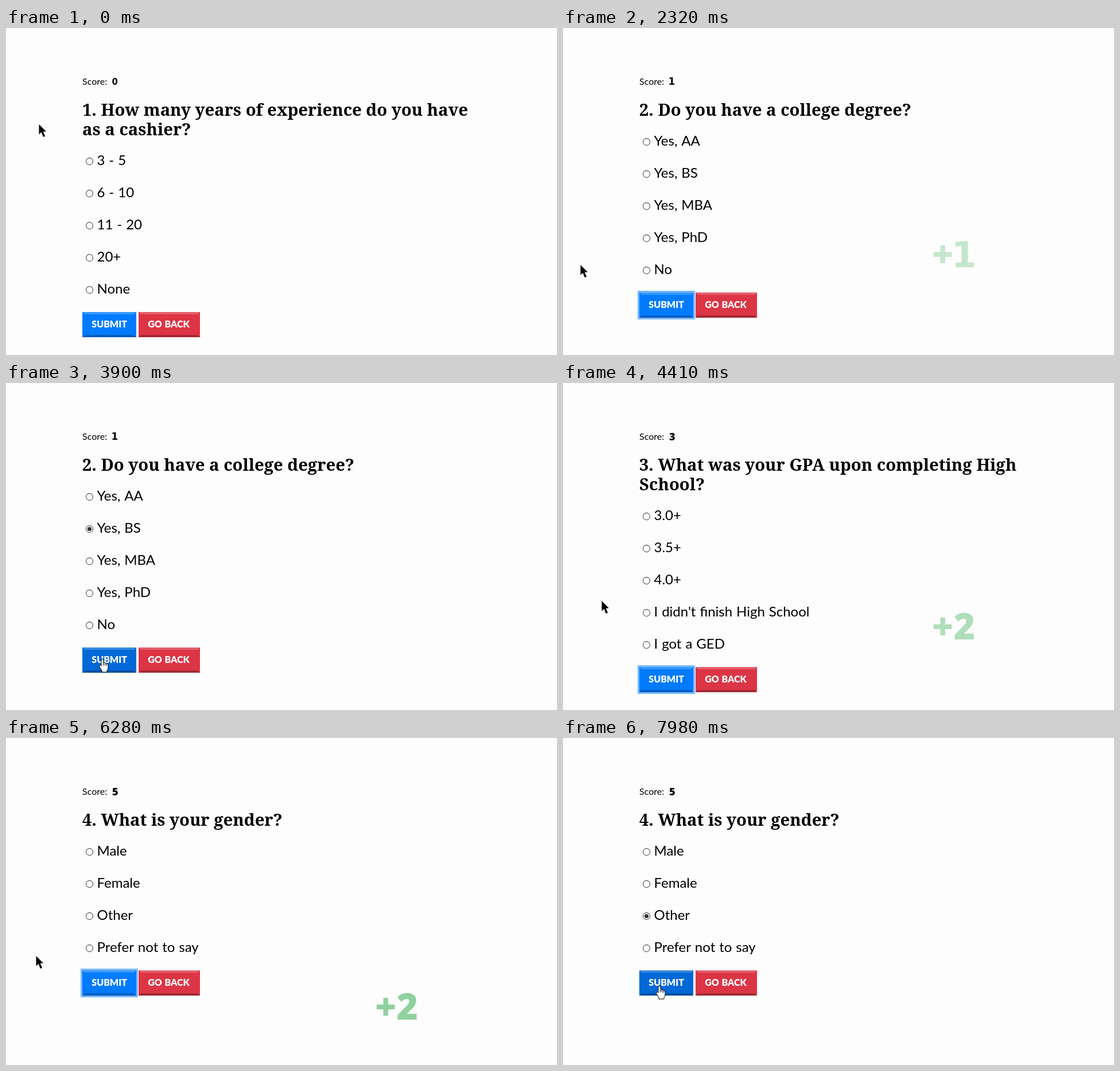
Animation, 960 px wide and 570 px high, one loop 8 s. Source, as an HTML page with a canvas:

```html
<!DOCTYPE html>
<html lang="en">
<head>
<meta charset="utf-8">
<title>Quiz</title>
<style>
html, body { margin: 0; width: 100%; height: 100%; overflow: hidden; background: #fdfdfd; }
canvas { display: block; }
</style>
</head>
<body>
<canvas id="stage" width="960" height="570"></canvas>
<script>
const ctx = document.getElementById('stage').getContext('2d');
const LOOP = 8000, LEFT = 133, WIDTH = 690, STEP = 56, ROW = 48;
const SANS = 'Lato, "Open Sans", sans-serif';
const SERIF = '"Noto Serif", "Liberation Serif", serif';
const DIGITS = '"Open Sans", "Noto Sans", sans-serif';
const SLAB = '"DejaVu Sans", sans-serif';

// pick: option clicked, press: submit clicked, aim: height of that click on the button,
// home and away: where the cursor waits before and after the pick
const pages = [
  { pick: 840, row: 0, press: 1730, aim: 20, home: [57, 168], away: [85, 355], score: 0,
    title: ['1. How many years of experience do you have', 'as a cashier?'],
    options: ['3 - 5', '6 - 10', '11 - 20', '20+', 'None'] },
  { pick: 3290, row: 1, press: 3900, aim: 20, home: [30, 413], away: [93, 350], score: 1, gain: 1,
    title: ['2. Do you have a college degree?'],
    options: ['Yes, AA', 'Yes, BS', 'Yes, MBA', 'Yes, PhD', 'No'] },
  { pick: 5180, row: 1, press: 5890, aim: 20, home: [67, 380], away: [102, 446], score: 3, gain: 2,
    title: ['3. What was your GPA upon completing High', 'School?'],
    options: ['3.0+', '3.5+', '4.0+', "I didn't finish High School", 'I got a GED'] },
  { pick: 7190, row: 2, press: 7970, aim: 27, home: [52, 380], away: [157, 336], score: 5, gain: 2,
    title: ['4. What is your gender?'],
    options: ['Male', 'Female', 'Other', 'Prefer not to say'] }
];

// every page repeats the same trip: home, option, away, submit
const path = [];
let last = -420;
for (const p of pages) {
  p.start = last + 70;
  p.top = 139 + p.title.length * 34;
  p.buttons = p.top + p.options.length * STEP + 8;
  const option = [179, p.top + p.row * STEP + 15];
  const submit = [167, p.buttons + p.aim];
  const stop = (from, to, at) => path.push({ t: from, at }, { t: to, at });
  stop(last + 400, last + 820, p.home);
  stop(p.pick - 165, p.pick + 50, option);
  stop(p.pick + 320, p.pick + 350, p.away);
  stop(p.press - 160, p.press + 20, submit);
  last = p.press;
}

const clamp = v => Math.max(0, Math.min(1, v));
const mix = (a, b, u) => a + (b - a) * u;

function cursorAt(t) {
  const i = path.findIndex(k => k.t > t);
  if (i < 1) return path.at(i).at;
  const a = path[i - 1], b = path[i];
  const u = clamp((t - a.t) / (b.t - a.t)), s = u * u * (3 - 2 * u);
  // bow each move a little towards the height of its right end
  const bow = a.at[0] < b.at[0] ? .6 : .4;
  const y = mix(mix(a.at[1], mix(a.at[1], b.at[1], bow), s),
                mix(mix(a.at[1], b.at[1], bow), b.at[1], s), s);
  return [Math.round(mix(a.at[0], b.at[0], s)), Math.round(y)];
}

const inside = ([px, py], x, y, w, h) => px >= x && px < x + w && py >= y && py < y + h;

function text(str, x, y, font, color = '#000', space = 0) {
  ctx.font = font;
  ctx.fillStyle = color;
  ctx.wordSpacing = space + 'px';
  ctx.fillText(str, x, y);
}

function shape(path2d, fill, stroke, width) {
  ctx.fillStyle = fill;
  ctx.strokeStyle = stroke;
  ctx.lineWidth = width;
  ctx.stroke(path2d);
  ctx.fill(path2d);
}

function disc(x, y, r, color) {
  ctx.fillStyle = color;
  ctx.beginPath();
  ctx.arc(x, y, r, 0, 7);
  ctx.fill();
}

function radio(y, checked, hover) {
  const ink = hover ? '#0067c0' : '#333';
  disc(145.5, y, 6.5, ink);
  disc(145.5, y, 5.5, '#fff');
  if (checked) disc(145.5, y, 3.6, ink);
}

// light or dark bevel strip between two heights
function bevel(x, w, outer, inner, color) {
  ctx.fillStyle = color;
  ctx.beginPath();
  ctx.moveTo(x, outer);
  ctx.lineTo(x + w, outer);
  ctx.lineTo(x + w - 4, inner);
  ctx.lineTo(x + 4, inner);
  ctx.fill();
}

function button(label, x, y, w, color) {
  ctx.fillStyle = color;
  ctx.fillRect(x, y, w, 44);
  bevel(x, w, y, y + 4, 'rgba(255,255,255,.22)');
  bevel(x, w, y + 44, y + 40, 'rgba(0,0,0,.25)');
  text(label, x + 16.3, y + 27, '900 16px ' + SANS, '#fff', 1);
}

const arrow = new Path2D('M0 0V17.5L4 13.8L7.4 22L10.6 20.6L7.2 12.7L12.5 12.4Z');
const hand = new Path2D('M4.5 13V2Q4.5 .5 6 .5T7.5 2V7Q10 6 10.3 8Q12.6 7 13 9' +
  'Q15.5 8.3 15.5 11V15Q15.5 18 13.5 20V22.5H5.5V20Q3 17 1 13.5Q.2 11.5 2 11.3Q3.4 11.4 4.5 13Z');
const fingers = new Path2D('M7.5 7V11.5M10.3 8V11.5M13 9V12');

function drawCursor([x, y], pointing) {
  ctx.save();
  ctx.translate(x + (pointing ? -5 : .5), y);
  if (pointing) {
    shape(hand, '#fff', '#000', 1.8);
    ctx.lineWidth = 1;
    ctx.stroke(fingers);
  } else {
    shape(arrow, '#000', '#fff', 1.6);
  }
  ctx.restore();
}

function drawGain(page, t) {
  const age = t - page.start + 70;
  if (!page.gain || age > 790) return;
  const base = 636 - age * .37, green = '#28a745';
  ctx.globalAlpha = clamp(1 - age / 800);
  text('+', 643.5, base, '800 64px ' + DIGITS, green);
  if (page.gain === 1) text('1', 676.5, base, 'bold 63px ' + SLAB, green);
  else text(page.gain, 680.5, base, '800 64px ' + DIGITS, green);
  ctx.globalAlpha = 1;
}

function drawScore(score) {
  text('Score:', LEFT, 99, '16px ' + SANS);
  if (score === 0) text('0', 185, 99, '900 16px ' + SANS);
  else if (score === 1) text('1', 183.5, 99, 'bold 17px ' + SLAB);
  else text(score, 185, 99.5, '800 18px ' + DIGITS);
}

function draw(t) {
  const page = pages.findLast(p => t >= p.start), { top, buttons } = page;
  const cur = cursorAt(t);
  ctx.fillStyle = '#fdfdfd';
  ctx.fillRect(0, 0, 960, 570);

  drawScore(page.score);
  page.title.forEach((line, i) => text(line, LEFT, 152.5 + i * 34, 'bold 29.2px ' + SERIF));

  page.options.forEach((label, i) => {
    const y = top + i * STEP;
    const hover = inside(cur, LEFT, y, WIDTH, ROW);
    if (hover) {
      ctx.fillStyle = '#e3e3e3';
      ctx.fillRect(LEFT, y, WIDTH, ROW);
    }
    radio(y + 25.5, t >= page.pick && i === page.row, hover);
    text(label, 158.5, y + 32, '24px ' + SANS, '#000', .8);
  });

  // hover colour eases over 150 ms
  const onSubmit = p => inside(p, LEFT, buttons, 94, 44);
  let glow = 0;
  for (let k = 0; k < 10; k++) glow += onSubmit(cursorAt(Math.max(0, t - k * 15))) / 10;

  // focus ring stays from the last press until an option is picked
  const fade = from => clamp((t - from) / 150);
  const ring = t >= page.press ? fade(page.press) : page.gain ? 1 - fade(page.pick) : 0;
  ctx.fillStyle = `rgba(0,123,255,${.52 * ring})`;
  ctx.fillRect(LEFT - 3 * ring, buttons - 3 * ring, 94 + 6 * ring, 44 + 6 * ring);

  button('SUBMIT', LEFT, buttons, 94, `rgb(0,${123 - 19 * glow},${255 - 40 * glow})`);
  button('GO BACK', 231, buttons, 107, '#dc3545');

  drawGain(page, t);
  drawCursor(cur, onSubmit(cur));
}

function tick() {
  draw(performance.now() % LOOP);
  requestAnimationFrame(tick);
}
tick();
</script>
</body>
</html>
```
